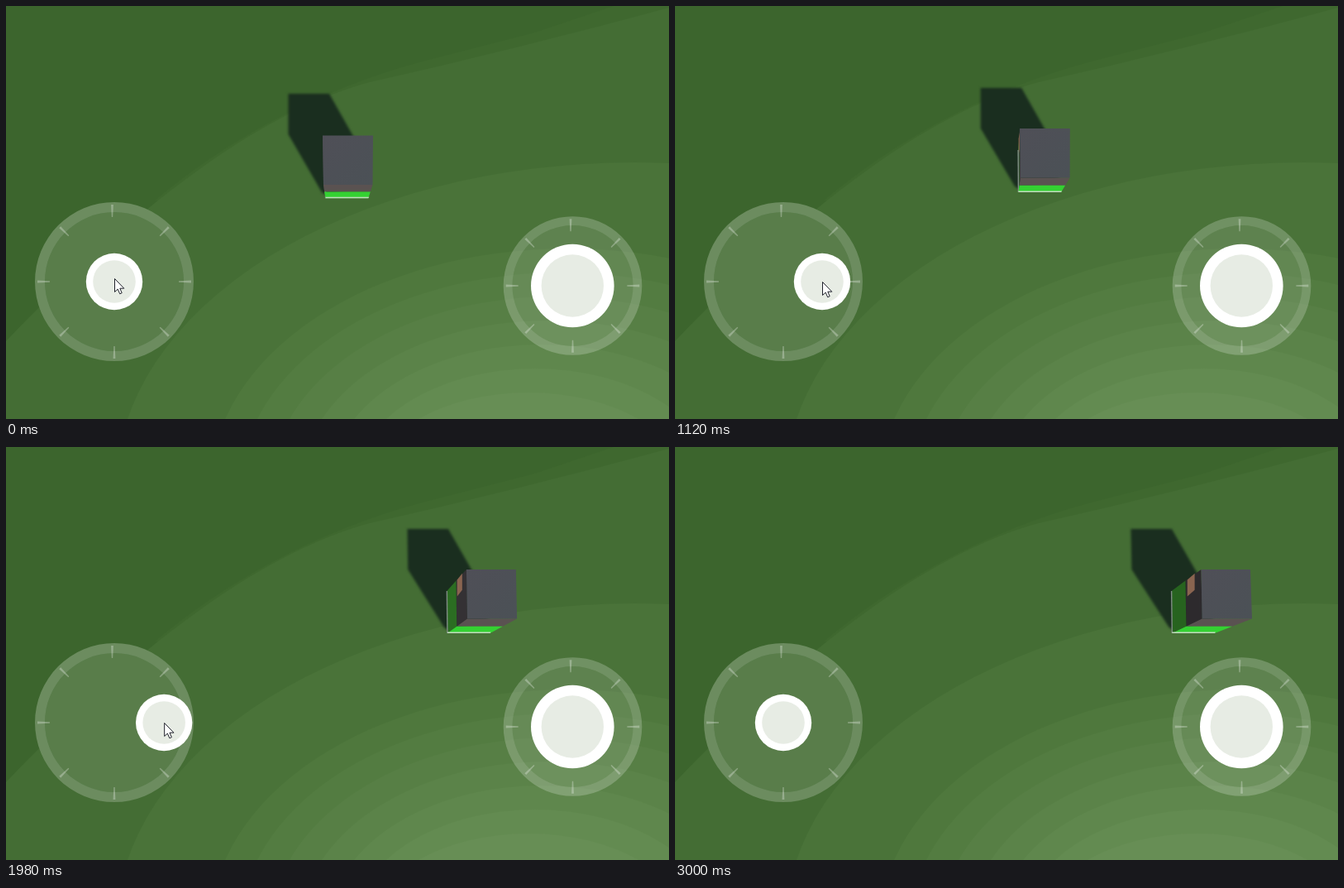
Write an HTML page with a canvas that moves like this. It is 802 by 499 pixels and loops after 4410 ms.

```html
<!DOCTYPE html>
<html lang="en">
<head>
<meta charset="utf-8">
<title>Joystick cube</title>
<style>
  html, body { margin: 0; width: 100%; height: 100%; overflow: hidden; background: #3c652d; }
  canvas { display: block; }
</style>
</head>
<body>
<canvas id="stage" width="802" height="499"></canvas>
<script>
const ctx = document.getElementById('stage').getContext('2d');
const LOOP = 4410, STEPS = 19, RELEASE = 15;
const PAD = { x: 131, y: 333 };

// The picture advances in steps that grow slightly longer
const stepStart = k => 280 + 136.5 * k + 0.34 * k * k;

const clamp = (v, min, max) => Math.min(max, Math.max(min, v));
const ramp = (k, from, to) => clamp((k - from) / (to - from), 0, 1);

// Pushes right, creeps outward, then lets go and drifts off
function pointer(k) {
  const leave = ramp(k, RELEASE, 18) ** 3;
  return {
    x: 131 + 47 * ramp(k, 3, 6) ** 0.85 + 4 * ramp(k, 6, 10) + 11 * ramp(k, 10, 12.4) + 80 * leave,
    y: 329 + 4 * ramp(k, 4, 6) + 118 * leave
  };
}

// The cube speeds up evenly until the stick is released
function slide(k) {
  const n = k - 6;
  return clamp(34 + 20.5 * n + 0.47 * n * n, 0, 253.5);
}

function poly(fill, ...points) {
  ctx.fillStyle = fill;
  ctx.beginPath();
  points.forEach(p => ctx.lineTo(...p));
  ctx.closePath();
  ctx.fill();
}

function disc(x, y, r, fill, hole = 0) {
  ctx.fillStyle = fill;
  ctx.beginPath();
  ctx.arc(x, y, r, 0, 7);
  if (hole) {
    ctx.closePath();
    ctx.moveTo(x + hole, y);
    ctx.arc(x, y, hole, 0, 7);
  }
  ctx.fill('evenodd');
}

function shape(fill, path) {
  ctx.fillStyle = fill;
  ctx.fill(new Path2D(path));
}

// Elliptic light band with its top at `top`, crossing the lower edge at `left`
function band(fill, cx, top, left) {
  const ry = 580 - top, rx = (cx - left) / Math.sqrt(1 - (81 / ry) ** 2);
  ctx.fillStyle = fill;
  ctx.beginPath();
  ctx.ellipse(cx, 580, rx, ry, 0, 0, 7);
  ctx.fill();
}

function drawGround() {
  ctx.fillStyle = '#3c652d';
  ctx.fillRect(0, 0, 802, 499);
  shape('#3f682f', 'M180 235C300 135 420 90 500 68L640 32L735 0H802V235Z');
  shape('#446d34', 'M0 405C150 250 300 130 440 92C560 65 680 35 802 2V499H0Z');
  disc(PAD.x, PAD.y, 96, '#446d34');
  band('#4a7339', 760, 189, 147);
  for (let i = 0; i < 7; i++) {
    band(`rgb(${79 + 4 * i} ${120 + 3.7 * i} ${61 + 4 * i})`, 680 - 8 * i, 293 + 29 * i, 265 + 39 * i);
  }
}

function drawPad(x, y, r, inner) {
  disc(x, y, inner, 'rgba(255,255,255,.11)');
  disc(x, y, r, 'rgba(255,255,255,.21)', inner);
  for (let i = 0; i < 8; i++) {
    ctx.save();
    ctx.translate(i === 6 ? x - 2.5 : x, y);
    ctx.rotate(i * Math.PI / 4);
    poly('rgba(255,255,255,.29)', [r - 18, -.7], [r - 3, -1.4], [r - 3, 1.4], [r - 18, .7]);
    ctx.restore();
  }
}

function drawKnob(x, y, r, inner) {
  disc(x, y, r, '#fff');
  disc(x, y, inner, '#e7ece4');
}

function drawCube(u, lift) {
  // Points nearer the ground travel less on screen
  const p = (x, y, depth) => [x + u * depth, y - lift * depth];
  const topL = p(383, 156.5, 1), topR = p(444, 156.5, .994);
  const edgeL = p(384, 216, 1), edgeR = p(443.5, 216, 1.004);
  const midL = p(385.2, 224.5, .92), midR = p(440.8, 224.5, .92);
  const lowL = p(386.6, 232.2, .847), lowR = p(438.3, 232.2, .847);
  const backMid = p(385, 169.3, .917), backLow = p(386.4, 181.2, .845);

  ctx.filter = 'blur(1.5px)';
  poly('#1a2e1f', p(341.5, 106, .828), p(391, 106, .828), p(421, 159, .83),
    p(436, 215, .85), p(388, 229, .85), p(382, 225, .85), p(341.5, 155, .832));
  ctx.filter = 'none';

  // The side darkens as it turns into view
  poly(`hsl(300 3% ${26 - .035 * u}%)`, topL, edgeL, midL, backMid);
  poly(`hsl(113 52% ${33.5 - .031 * u}%)`, backMid, midL, lowL, backLow);
  poly('#8a6450', p(384, 168.5, .93), p(384, 161, .965), p(384, 181, .965), p(384, 188.5, .93));
  ctx.strokeStyle = '#7f8c84';
  ctx.lineWidth = 1.4;
  ctx.beginPath();
  ctx.moveTo(...backLow);
  ctx.lineTo(...lowL);
  ctx.stroke();

  poly('#5a5251', edgeL, edgeR, midR, midL);
  poly('#34d132', midL, midR, lowR, lowL);
  poly('#c4dcc0', [lowL[0], lowL[1] - 1.4], [lowR[0] + 1, lowR[1] - 1.4], lowR, lowL);

  const shade = ctx.createLinearGradient(...topL, ...edgeR);
  shade.addColorStop(0, '#4f4f57');
  shade.addColorStop(1, '#4b5156');
  poly(shade, topL, topR, edgeR, edgeL);
}

function drawPointer({ x, y }) {
  ctx.save();
  ctx.translate(x + .5, y + .5);
  ctx.strokeStyle = '#20222c';
  ctx.lineWidth = 1;
  poly('#fff', [0, 0], [0, 16], [3.7, 12.6], [6.2, 18.3], [8.7, 17.2], [6.3, 11.7], [11.3, 11.7]);
  ctx.stroke();
  ctx.restore();
}

function draw(k) {
  const mouse = pointer(k);
  const knob = k >= 0 && k < RELEASE ? mouse : PAD;
  drawGround();
  drawCube(slide(k), 8.5 * ramp(k, 0, 6));
  drawPad(PAD.x, PAD.y, 96, 84);
  drawKnob(knob.x, knob.y, 34.2, 25.8);
  drawPad(685.5, 338, 83.8, 73);
  drawKnob(685.3, 338, 50.3, 37.7);
  if (k < STEPS) drawPointer(mouse);
}

let shown;
function frame() {
  const now = performance.now() % LOOP;
  let k = -1;
  while (k < STEPS && stepStart(k + 1) <= now) k++;
  if (k !== shown) draw(shown = k);
  requestAnimationFrame(frame);
}
frame();
</script>
</body>
</html>
```
